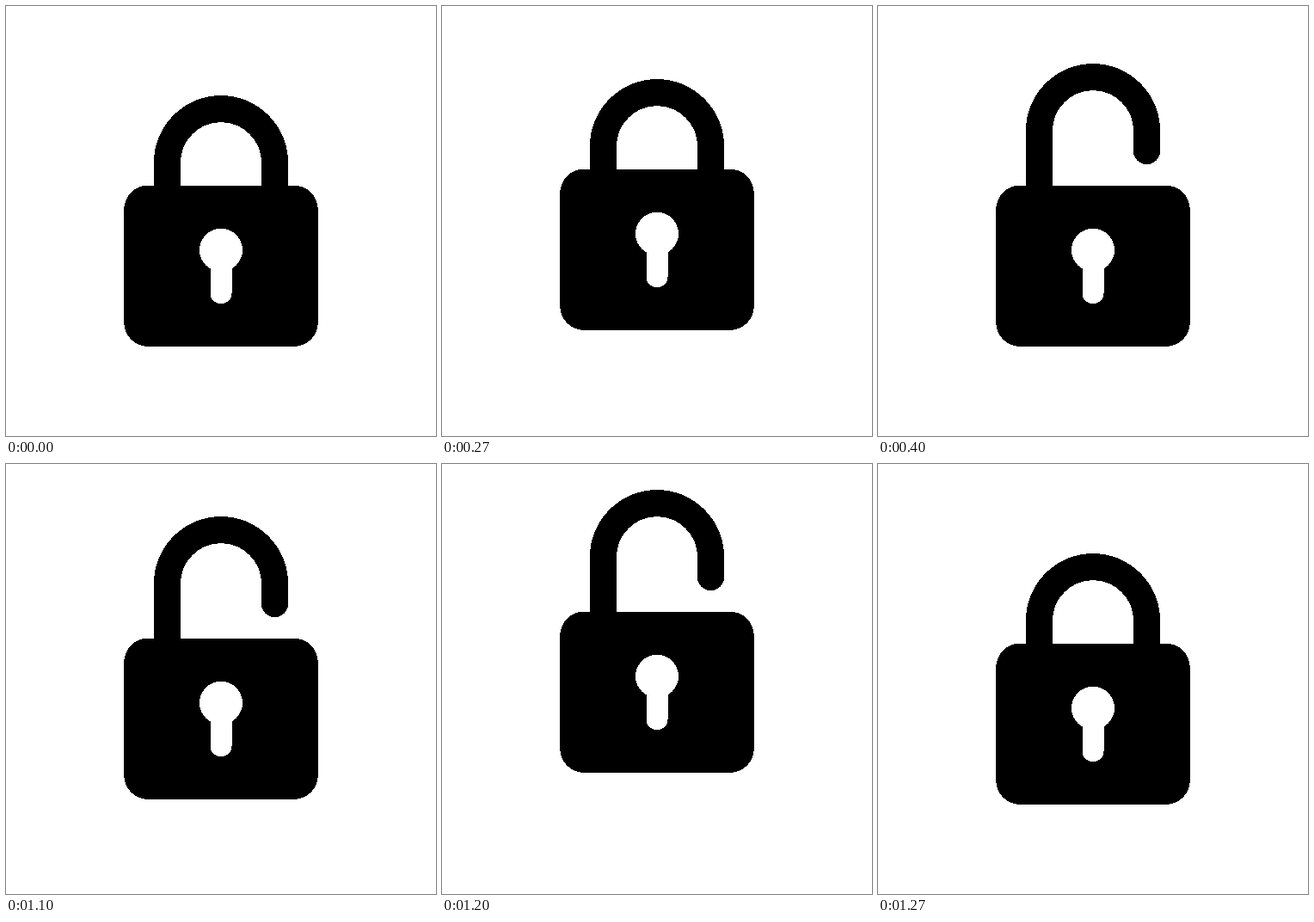
An HTML page that plays this animation: 500x500 px, repeating every 1630 ms.

```html
<!DOCTYPE html>
<html lang="en">
<head>
<meta charset="utf-8">
<title>Padlock</title>
<style>
  html, body {
    margin: 0;
    width: 100%;
    height: 100%;
    overflow: hidden;
    background: #fff;
  }
  svg {
    display: block;
    width: 100%;
    height: 100%;
    shape-rendering: crispEdges;
  }
  .shackle, .keyhole {
    fill: none;
    stroke-linecap: round;
  }
  .shackle {
    stroke: #000;
    stroke-width: 31.25;
  }
  .keyhole {
    stroke: #fff;
    stroke-width: 25;
  }
  .lock, .shackle {
    animation: hop 1630ms step-end infinite;
  }
  .shackle {
    animation-name: slide;
  }

  /* The whole lock eases up over four ticks and drops in two, twice per loop. */
  @keyframes hop {
    0%, 24.5398%, 77.9141%, 100% { transform: translateY(0); }
    14.1104%, 67.4846% { transform: translateY(-6px); }
    16.5644%, 69.3251% { transform: translateY(-19px); }
    18.4049%, 71.7791% { transform: translateY(-32px); }
    20.2453%, 73.6196% { transform: translateY(-37px); }
    22.6993%, 75.4601% { transform: translateY(-19px); }
  }

  /* The shackle slides relative to the body during each drop. */
  @keyframes slide {
    0%, 77.9141%, 100% { transform: translateY(0); }
    22.6993%, 75.4601% { transform: translateY(-18px); }
    24.5398% { transform: translateY(-37px); }
  }
</style>
</head>
<body>
<svg viewBox="0 0 500 500">
  <g class="lock">
    <path class="shackle" d="M187.5 260V182.2a62.5 62.5 0 0 1 125 0V205.5"/>
    <rect x="137.2" y="208.6" width="225.6" height="187.3" rx="28"/>
    <circle cx="250" cy="283.8" r="25" fill="#fff"/>
    <path class="keyhole" d="M250 284V333.8"/>
  </g>
</svg>
</body>
</html>
```
